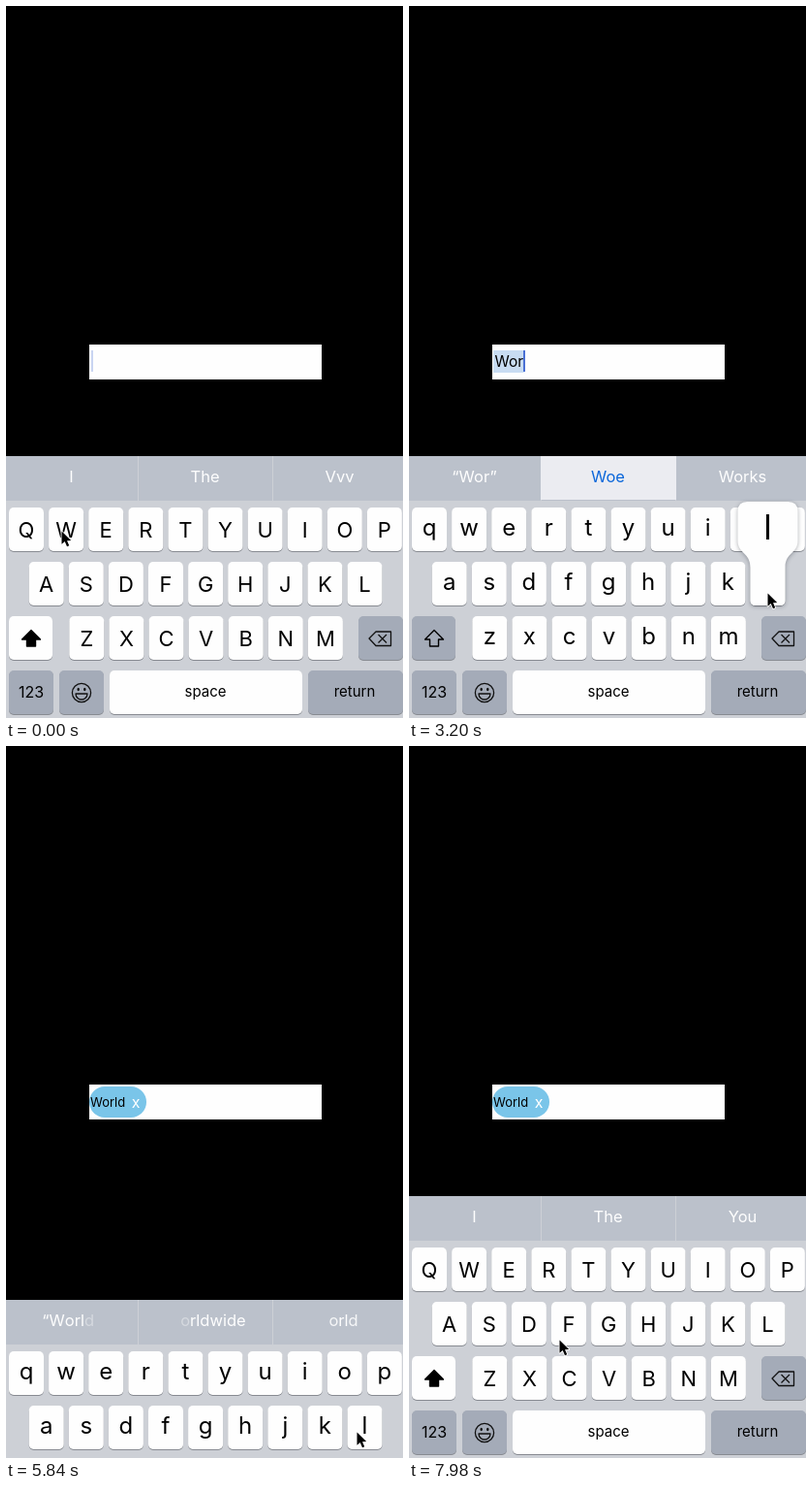
Recreate the animation shown at these times as an HTML page with a canvas. Size 410 px wide and 734 px high, loop 8 s.

```html
<!DOCTYPE html>
<html lang="en">
<head>
<meta charset="utf-8">
<title>Token field typing</title>
<style>
html, body { margin: 0; width: 100%; height: 100%; overflow: hidden; background: #000; }
canvas { display: block; }
</style>
</head>
<body>
<canvas id="stage" width="410" height="734"></canvas>
<script>
const LOOP = 8000, HIDE = 5778, SHOW = 7251, KEYBOARD_HEIGHT = 270;
const ctx = document.getElementById('stage').getContext('2d');
const WHITE = '#fefefe', GREY = '#a4abb8', BLUE = '#0a66da', BLACK = '#000';

// Field text and suggestions from each moment on
const states = [
  { at: 0, text: '', words: ['I', 'The', 'Vvv'], upper: true },
  { at: 400, text: 'W', words: ['“W”', 'We', 'Would'] },
  { at: 1300, text: 'Wo', words: ['“Wo”', 'Would', 'Works'] },
  { at: 2280, text: 'Wor', words: ['“Wor”', 'Woe', 'Works'] },
  { at: 2400, text: 'Wor', words: ['“Wor”', 'Woe', 'Works'], correcting: true },
  { at: 3280, text: 'Worl', words: ['“Worl”', 'World', 'Worlds'] },
  { at: 4420, text: 'World', words: ['“World”', 'Worldwide', 'Worlds'] },
  { at: HIDE, token: true, words: ['“World”', 'Worldwide', 'Worlds'], fading: true },
  { at: SHOW, token: true, words: ['I', 'The', 'You'], upper: true }
];
const edits = [-820, 400, 1300, 2280, 3280, 4420, SHOW];
const presses = [
  [260, 400, 'w'], [1160, 1300, 'o'], [2120, 2280, 'r'],
  [3120, 3280, 'l'], [4280, 4420, 'd'], [5620, HIDE, 'return']
];
// Pointer moves: start, end, x, y, sideways bend in y
const moves = [
  [0, 0, 57, 541, 0], [450, 1110, 349, 546, 20], [1360, 2006, 142, 546, 27],
  [2400, 3060, 370, 605, 0], [3380, 4220, 116, 601, 0],
  [4620, 5480, 362, 707, 0], [6440, 7060, 224, 378, 0], [7400, 7980, 155, 612, 0]
];

const clamp = v => Math.max(0, Math.min(1, v));
const smooth = v => v * v * (3 - 2 * v);
const settle = ms => {
  const x = Math.max(0, ms) * 0.0217;
  return 1 - (1 + x) * Math.exp(-x);
};
const lastBefore = (list, t) => list.filter(s => s.at <= t).pop();

function rect(x, y, w, h, color) {
  ctx.fillStyle = color;
  ctx.fillRect(x, y, w, h);
}

function round(x, y, w, h, r, color) {
  ctx.fillStyle = color;
  ctx.beginPath();
  ctx.roundRect(x, y, w, h, r);
  ctx.fill();
}

function setFont(size) {
  ctx.font = `${size}px Inter, Roboto, sans-serif`;
}

function label(text, x, y, size, color = BLACK, align = 'center') {
  setFont(size);
  ctx.textAlign = align;
  ctx.fillStyle = color;
  ctx.fillText(text, x, y);
}

function trace(points, close = true) {
  ctx.beginPath();
  points.forEach(([x, y]) => ctx.lineTo(x, y));
  if (close) ctx.closePath();
}

function key(x, y, w, color = WHITE) {
  round(x, y + 1, w, 45, 5, '#888b92');
  round(x, y, w, 45, 5, color);
}

function shiftIcon(filled) {
  trace([[26, 643.5], [35.5, 653], [30.5, 653], [30.5, 660], [21.5, 660], [21.5, 653], [16.5, 653]]);
  ctx.lineJoin = 'round';
  ctx.lineWidth = 1.4;
  ctx.strokeStyle = ctx.fillStyle = BLACK;
  ctx.stroke();
  if (filled) ctx.fill();
}

function deleteIcon() {
  ctx.lineWidth = 1.3;
  ctx.strokeStyle = '#111';
  trace([[375, 652], [382, 645], [397.5, 645], [397.5, 659.5], [382, 659.5]]);
  ctx.stroke();
  trace([[384.5, 648], [393, 656.5]], false);
  ctx.stroke();
  trace([[393, 648], [384.5, 656.5]], false);
  ctx.stroke();
}

function smiley() {
  ctx.strokeStyle = ctx.fillStyle = '#111';
  ctx.lineWidth = 1.3;
  ctx.beginPath();
  ctx.arc(78, 708, 9.6, 0, 7);
  ctx.stroke();
  for (const x of [74.7, 81.3]) {
    ctx.beginPath();
    ctx.ellipse(x, 704.5, 1.2, 1.8, 0, 0, 7);
    ctx.fill();
  }
  ctx.beginPath();
  ctx.arc(78, 709, 6, 0, Math.PI);
  ctx.closePath();
  ctx.stroke();
}

function popup(cx, y, char) {
  ctx.save();
  ctx.shadowColor = 'rgba(50,55,65,.4)';
  ctx.shadowBlur = 4;
  ctx.shadowOffsetY = 1;
  ctx.fillStyle = WHITE;
  ctx.beginPath();
  ctx.moveTo(cx - 21, y - 62);
  ctx.lineTo(cx + 21, y - 62);
  ctx.quadraticCurveTo(cx + 31, y - 62, cx + 31, y - 52);
  ctx.lineTo(cx + 31, y - 22);
  ctx.bezierCurveTo(cx + 31, y - 8, cx + 18, y - 10, cx + 18, y + 6);
  ctx.lineTo(cx + 18, y + 40);
  ctx.quadraticCurveTo(cx + 18, y + 45, cx + 13, y + 45);
  ctx.lineTo(cx - 13, y + 45);
  ctx.quadraticCurveTo(cx - 18, y + 45, cx - 18, y + 40);
  ctx.lineTo(cx - 18, y + 6);
  ctx.bezierCurveTo(cx - 18, y - 10, cx - 31, y - 8, cx - 31, y - 22);
  ctx.lineTo(cx - 31, y - 52);
  ctx.quadraticCurveTo(cx - 31, y - 62, cx - 21, y - 62);
  ctx.fill();
  ctx.restore();
  label(char, cx, y - 23, 35);
}

// Letters vanish one after another, from the right, the left or both ends
function fadingWord(word, cx, side, gone) {
  setFont(16.5);
  let x = cx - ctx.measureText(word).width / 2;
  [...word].forEach((char, i) => {
    const fromEnd = word.length - 1 - i;
    const depth = [fromEnd, i, Math.min(i, fromEnd)][side];
    ctx.globalAlpha = clamp(depth + 1 - gone + (side === 2 ? 0.5 : 0));
    label(char, x, 491, 16.5, WHITE, 'left');
    x += ctx.measureText(char).width;
  });
  ctx.globalAlpha = 1;
}

function suggestions(state, t) {
  rect(0, 464, 410, 46, '#bbc1cb');
  rect(136, 464, 1, 46, '#cdd0d6');
  rect(275, 464, 1, 46, '#cdd0d6');
  if (state.correcting) rect(136, 464, 140, 45, '#ebecf1');
  state.words.forEach((word, i) => {
    const x = [67.5, 205.5, 344.5][i];
    if (state.fading) fadingWord(word, x, i, (t - HIDE) / 39);
    else label(word, x, 491, 16.5, state.correcting && i === 1 ? BLUE : WHITE);
  });
}

function keyboard(state, t) {
  const shift = t < HIDE ? 0 : KEYBOARD_HEIGHT * (settle(t - HIDE) - settle(t - SHOW));
  const press = presses.find(([from, to]) => t >= from && t < to);
  const pressed = press && press[2];
  let raised;
  ctx.save();
  ctx.translate(0, Math.round(shift));
  rect(0, 464, 410, 270, '#cdd0d6');
  suggestions(state, t);
  ['qwertyuiop', 'asdfghjkl', 'zxcvbnm'].forEach((row, r) => {
    const y = 517 + 56 * r;
    [...row].forEach((char, i) => {
      const x = [3, 23.7, 65.3][r] + 41.1 * i;
      const shown = state.upper ? char.toUpperCase() : char;
      key(x, y, 36);
      if (char === pressed) raised = [x + 18, y, shown];
      if (state.upper) label(shown, x + 18, y + 31, 22);
      else label(shown, x + 18, y + 29, 24);
    });
  });
  key(3, 629, 45, state.upper ? WHITE : GREY);
  shiftIcon(state.upper);
  key(364, 629, 46, GREY);
  deleteIcon();
  key(3, 685, 46, GREY);
  label('123', 26, 713, 16);
  key(55, 685, 46, GREY);
  smiley();
  key(107, 685, 199);
  label('space', 206, 712, 15);
  key(312, 685, 98, pressed === 'return' ? WHITE : GREY);
  label('return', 360, 712, 15);
  if (raised) popup(...raised);
  ctx.restore();
}

function caretAlpha(t) {
  const phase = ((t - edits.filter(e => e <= t).pop()) % 1000) / 1000;
  return phase < 0.5 ? 1 : phase < 0.8 ? clamp((0.65 - phase) / 0.15) : clamp((phase - 0.78) / 0.14);
}

function field(state, t) {
  rect(86, 349, 240, 36, WHITE);
  let caretX = 149;
  if (state.token) {
    round(86, 351, 59, 32, 16, '#7ac5e9');
    label('World', 87, 372, 13, BLACK, 'left');
    label('x', 134, 373, 16, '#fff');
  } else {
    setFont(15.5);
    const width = ctx.measureText(state.text).width;
    caretX = 88 + width;
    if (state.correcting) rect(87, 355, width + 2, 23, '#c8dcf2');
    label(state.text, 88.5, 372, 15.5, BLACK, 'left');
  }
  if (t >= HIDE && t < SHOW) return;
  ctx.globalAlpha = caretAlpha(t);
  rect(Math.round(caretX), 355, 2, 22, '#4a70d4');
  ctx.globalAlpha = 1;
}

function pointerAt(t) {
  let [, , x, y] = moves[0];
  for (const [from, to, nextX, nextY, bend] of moves.slice(1)) {
    if (t < from) break;
    const u = smooth(clamp((t - from) / (to - from)));
    x += (nextX - x) * u;
    y += (nextY - y) * u + 4 * u * (1 - u) * bend;
  }
  return [x, y];
}

function pointer(t) {
  ctx.save();
  ctx.translate(...pointerAt(t).map(v => Math.round(v) + 0.5));
  ctx.scale(0.92, 0.92);
  trace([[0, 0], [0, 14.5], [3.5, 11.5], [6, 17], [8.4, 16], [6, 10.6], [10.5, 10.4]]);
  ctx.lineJoin = 'round';
  ctx.lineWidth = 1.8;
  ctx.strokeStyle = WHITE;
  ctx.stroke();
  ctx.fillStyle = BLACK;
  ctx.fill();
  ctx.restore();
}

function draw() {
  const t = performance.now() % LOOP;
  const state = lastBefore(states, t);
  rect(0, 0, 410, 734, BLACK);
  field(state, t);
  keyboard(state, t);
  pointer(t);
  requestAnimationFrame(draw);
}
draw();
</script>
</body>
</html>
```
